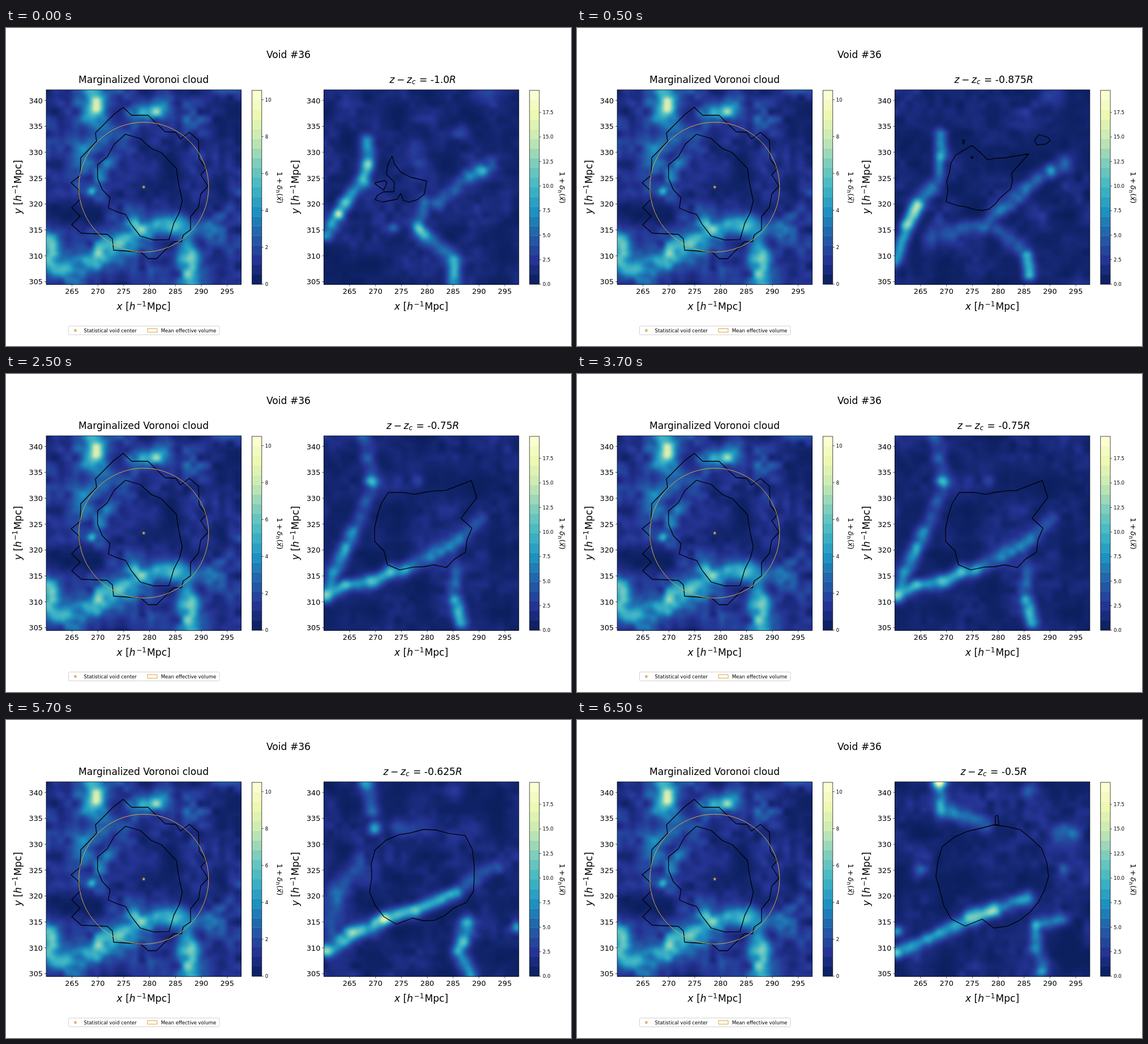
Write an HTML page with a canvas that moves like this. It is 998x561 px and loops after 8 s.

```html
<!DOCTYPE html>
<html lang="en">
<head>
<meta charset="utf-8">
<title>Void #36</title>
<style>
html, body { margin: 0; width: 100%; height: 100%; overflow: hidden; background: #fff; }
canvas, svg { position: absolute; left: 0; top: 0; }
canvas { top: 109px; width: 344.5px; height: 343.5px; }
svg { width: 998px; height: 561px; font-family: "DejaVu Sans", Verdana, sans-serif; }
.big { font-size: 17.12px; }
.mid { font-size: 12.84px; }
.small { font-size: 8.56px; }
.i { font-style: italic; }
.sub { font-size: 70%; }
.line { fill: none; stroke: #000; stroke-width: 1.3; stroke-linejoin: round; }
.axis { fill: none; stroke: #000; stroke-width: .7; }
.gold { fill: none; stroke: #d9a83c; stroke-width: 1; }
.star { fill: #d6a443; }
.s { visibility: hidden; animation: 8s step-end infinite; }
.s0 { animation-name: s0; }
.s1 { animation-name: s1; }
.s2 { animation-name: s2; }
.s3 { animation-name: s3; }
.s4 { animation-name: s4; }
@keyframes s0 { 0% { visibility: visible } 6.25%, 100% { visibility: hidden } }
@keyframes s1 { 0% { visibility: hidden } 6.25% { visibility: visible } 31.25%, 100% { visibility: hidden } }
@keyframes s2 { 0% { visibility: hidden } 31.25% { visibility: visible } 56.25%, 100% { visibility: hidden } }
@keyframes s3 { 0% { visibility: hidden } 56.25% { visibility: visible } 81.25%, 100% { visibility: hidden } }
@keyframes s4 { 0% { visibility: hidden } 81.25%, 100% { visibility: visible } }
</style>
</head>
<body>
<script>
const TOP = 109, W = 344.5, H = 343.5, LEFT = 71, RIGHT = 561.4;
const STOPS = ['081d58', '253494', '225ea8', '1d91c0', '41b6c4', '7fcdbb', 'c7e9b4', 'edf8b1', 'ffffd9']
  .map(h => [0, 2, 4].map(i => parseInt(h.substr(i, 2), 16)));

function color(v) {
  const p = Math.min(.9999, Math.max(0, v)) * 8, i = Math.floor(p);
  return STOPS[i].map((c, k) => c + (STOPS[i + 1][k] - c) * (p - i));
}

// Smooth value noise on a seeded lattice
function noise(seed, cell) {
  const n = Math.ceil(W / cell) + 3, g = [];
  for (let i = 0; i < n * n; i++) {
    seed = (seed * 16807) % 2147483647;
    g.push(seed / 2147483647);
  }
  const ease = t => t * t * (3 - 2 * t), mix = (a, b, t) => a + (b - a) * t;
  return (x, y) => {
    const i = Math.floor(x / cell), j = Math.floor(y / cell), k = j * n + i;
    const u = ease(x / cell - i), v = ease(y / cell - j);
    return mix(mix(g[k], g[k + 1], u), mix(g[k + n], g[k + n + 1], u), v);
  };
}

// Each filament is "radius strength x y x y ..."; a single point makes a blob
function segments(spec) {
  return spec.split(';').flatMap(s => {
    const [r, a, ...p] = s.trim().split(/\s+/).map(Number), out = [];
    for (let i = 0; i < Math.max(2, p.length - 2); i += 2)
      out.push({ r, a, x: p[i], y: p[i + 1], dx: (p[i + 2] ?? p[i]) - p[i], dy: (p[i + 3] ?? p[i + 1]) - p[i + 1] });
    return out;
  });
}

function heat(left, spec, seed, grain, cls) {
  const c = document.createElement('canvas');
  c.width = 173; c.height = 172; c.className = cls;
  c.style.left = left + 'px';
  const ctx = c.getContext('2d'), img = ctx.createImageData(c.width, c.height);
  const segs = segments(spec), fine = noise(seed, 13), lump = noise(seed + 57, 19), broad = noise(seed + 91, 44);
  for (let py = 0, o = 0; py < c.height; py++) for (let px = 0; px < c.width; px++, o += 4) {
    const lx = (px + .5) * W / c.width, ly = (py + .5) * H / c.height;
    let sum = 0;
    for (const s of segs) {
      const x = lx + left - s.x, y = ly + TOP - s.y, len = s.dx ** 2 + s.dy ** 2;
      const t = len ? Math.max(0, Math.min(1, (x * s.dx + y * s.dy) / len)) : 0;
      const d = ((x - t * s.dx) ** 2 + (y - t * s.dy) ** 2) / s.r ** 2;
      if (d < 6) sum += (s.a * Math.exp(-d)) ** 2;
    }
    const f = fine(lx, ly), l = lump(lx, ly);
    const v = .01 + grain * (f + l) * broad(lx, ly) + Math.sqrt(sum) * (.75 + .25 * (f + l));
    img.data.set([...color(v), 255], o);
  }
  ctx.putImageData(img, 0, 0);
  document.body.append(c);
}

const cloud = `12 .72 160 130 161 142; 24 .42 158 115 156 152; 22 .2 165 160 165 190 140 215 128 245;
  15 .2 186 236; 16 .3 268 147; 16 .18 225 155 280 142; 18 .32 236 350 300 347; 18 .28 290 350 355 354;
  17 .33 318 365 322 400 328 450; 18 .33 73 375 82 412 105 424; 20 .27 105 424 160 402 200 380 230 355;
  8 .18 152 286`;

const slides = [
  { z: '-1.0',
    heat: `12 .38 638 200 640 240 632 265 600 308 566 365; 10 .55 588 328; 13 .36 838 249;
      12 .2 855 240 820 262 760 310; 12 .25 740 308 728 352; 12 .35 728 352 740 364;
      14 .22 740 364 790 402; 13 .34 790 410 792 450; 10 .18 685 351; 18 .13 835 117 852 117;
      14 .13 805 185; 16 .1 730 235 725 210`,
    lines: ['682,226 686,240 697,254 714,263 743,270 739,293 726,303 712,307 702,304 697,292 691,302 665,307 652,303 656,295 667,289 685,289 686,272 672,258 674,242',
      '652,273 669,269 673,273 667,286 652,275'] },
  { z: '-0.875',
    heat: `12 .3 642 188 643 225; 11 .17 643 225 640 270; 15 .27 628 282 602 308; 12 .52 602 312 583 350;
      11 .38 583 350 563 410; 12 .33 838 252; 13 .18 860 238 815 264 750 320; 13 .18 750 320;
      13 .17 740 325 720 350 680 350; 13 .18 740 355 790 395; 11 .42 795 402 798 435;
      16 .11 630 370 685 355; 18 .12 845 118`,
    ring: [715, 270, '54 53 46 44 47 51 52 52 53 61 73 62 62 59 63 65 63 65 48 39 46 58 96 55'],
    lines: ['682,197 685,199 683,205 681,202', '696,227 700,228 698,230 696,229',
      '816,188 832,193 836,199 828,205 812,206 808,198'] },
  { z: '-0.75',
    heat: `12 .38 646 190; 13 .16 633 110 640 150 648 190 612 285; 13 .28 615 277 600 305 580 350 567 388;
      12 .48 566 390; 12 .33 566 392 600 372 648 366 680 348 705 346; 13 .25 705 346 750 320 800 290;
      12 .2 785 304 840 255; 12 .13 796 350 795 390; 12 .4 793 400 804 436; 10 .16 728 187`,
    ring: [738, 272, '85 79 85 77 80 67 68 71 85 91 81 90 87 85 87 89 73 62 63 68 77 119 108 68'] },
  { z: '-0.625',
    heat: `13 .38 637 112; 14 .2 637 112 648 160; 12 .2 645 160; 11 .4 651 190; 14 .1 688 190 735 190;
      18 .15 625 250 590 300 575 375; 12 .42 566 406; 13 .38 566 406 610 378 668 350; 11 .4 668 350;
      12 .42 668 350 720 336 795 305; 13 .13 798 303 865 258; 13 .33 814 358 808 390 800 408 820 450;
      10 .3 902 366; 15 .12 790 130`,
    ring: [737, 278, '90 92 88 76 77 78 76 74 95 98 98 98 91 95 98 93 87 82 85 87 90 105 100 93'] },
  { z: '-0.5',
    heat: `13 .75 640 108; 13 .32 641 112 645 158; 14 .2 648 156 722 186; 16 .19 801 125;
      14 .17 850 196 880 202; 10 .19 857 263; 11 .17 608 264; 11 .4 566 410; 12 .32 566 410 620 386 690 354;
      13 .55 695 348 738 334; 14 .3 738 332 795 314; 10 .28 565 372;
      13 .26 855 350 812 363 810 400 822 430; 11 .36 822 442; 10 .2 812 362`,
    ring: [736, 276, '97 93 91 90 90 91 91 78 101 106 102 98 102 102 105 98 92 88 91 91 95 94 98 97'],
    lines: ['739,185 739,170 742,168 744,171 745,185'] }
];

const outer = '207,140 222,154 251,154 281,183 300,184 308,196 324,184 340,198 341,231 354,248 344,259 357,279 344,293 340,316 326,333 326,356 313,365 310,377 296,377 266,407 251,407 238,395 190,392 188,372 179,364 133,362 116,347 131,332 116,317 131,302 129,286 115,273 131,260 132,229 160,200 158,185 190,153';
const inner = [237, 285, '70 77 80 84 102 92 82 63 51 56 65 55 67 78 87 82 92 101 90 75 75 72 74 69'];

const text = (x, y, s, cls, anchor = 'middle', more = '') =>
  `<text x="${x}" y="${y}" class="${cls}" text-anchor="${anchor}" ${more}>${s}</text>`;
const poly = (p, cls = 'line') => `<polygon class="${cls}" points="${p}"/>`;

// Closed outline from radii at equal angles, clockwise from the right
function polar(cx, cy, radii, turn = 0) {
  return radii.map((r, i) => {
    const a = turn + i / radii.length * 2 * Math.PI;
    return `${(cx + r * Math.cos(a)).toFixed(1)},${(cy + r * Math.sin(a)).toFixed(1)}`;
  }).join(' ');
}
const ring = ([cx, cy, radii]) => poly(polar(cx, cy, radii.split(' ').map(Number)));
const star = (cx, cy) => poly(polar(cx, cy, Array.from({ length: 10 }, (_, i) => i % 2 ? 1.5 : 3.6), -Math.PI / 2), 'star');

const unit = v => `<tspan class="i">${v}</tspan> [<tspan class="i">h</tspan>` +
  `<tspan class="sub" dx="1.5" dy="-6.2">−1</tspan><tspan dx="1.2" dy="6.2">Mpc]</tspan>`;

function axes(x0) {
  let s = `<rect class="axis" x="${x0}" y="${TOP}" width="${W}" height="${H}"/>`, d = '';
  for (let i = 0; i < 7; i++) {
    const x = x0 + 45.6 + i * 45.68;
    d += `M${x} 452.5v3`;
    s += text(x, 468.8, 265 + 5 * i, 'mid');
  }
  for (let i = 0; i < 8; i++) {
    const y = 127.8 + i * 45.68;
    d += `M${x0} ${y}h-3`;
    s += text(x0 - 6, y + 4.8, 340 - 5 * i, 'mid', 'end');
  }
  return s + `<path class="axis" d="${d}"/>` + text(x0 + 172.2, 497, unit('x'), 'big') +
    text(0, 0, unit('y'), 'big', 'middle', `transform="translate(${x0 - 44.5} 280.5) rotate(-90)"`);
}

function bar(x, step, count, gap, digits, labelX) {
  let s = '', d = '';
  for (let i = 0; i < 20; i++)
    s += `<rect x="${x}" y="${452 - (i + 1) * 17.1}" width="17.2" height="17.4" fill="rgb(${color((i + .5) / 20).map(Math.round)})"/>`;
  for (let i = 0; i < count; i++) {
    const y = 452 - i * gap;
    d += `M${x + 17.2} ${y}h3`;
    s += text(x + 23.2, y + 3.2, (i * step).toFixed(digits), 'small', 'start');
  }
  return s + `<rect class="axis" x="${x}" y="110" width="17.2" height="342"/><path class="axis" d="${d}"/>` +
    `<g class="mid" transform="translate(${labelX} 253.5) rotate(90)"><text>1<tspan x="10.7">+</tspan>` +
    `<tspan class="i" x="24">δ</tspan><tspan class="i sub" x="32" y="2.2">h</tspan><tspan x="38.3" y="0">(</tspan>` +
    `<tspan class="i" x="43.4">x</tspan><tspan x="51">)</tspan></text>` +
    `<path class="axis" d="M44.5 -9.3h6.5m-2 -1.7l2 1.7l-2 1.7"/></g>`;
}

heat(LEFT, cloud, 412733, .2, '');
slides.forEach((s, i) => heat(RIGHT, s.heat, 73309 + i * 19317, .09, 's s' + i));

let out = axes(LEFT) + axes(RIGHT) + bar(434.6, 2, 6, 65.1, 0, 479) + bar(924.8, 2.5, 8, 43.3, 1, 977.6);
out += text(499, 53, 'Void #36', 'big') + text(243, 96.6, 'Marginalized Voronoi cloud', 'big');
out += poly(outer) + ring(inner) + '<circle class="gold" cx="243.3" cy="280.7" r="114.6"/>' + star(243.3, 280.7);
out += '<rect x="110.5" y="525.8" width="266.5" height="15.4" rx="1.7" fill="#fff" stroke="#ccc" stroke-width=".9"/>';
out += star(122.5, 533.7) + text(137.6, 536.6, 'Statistical void center', 'small', 'start');
out += '<rect class="gold" x="250" y="530.5" width="17" height="6"/>' + text(273.7, 536.6, 'Mean effective volume', 'small', 'start');
slides.forEach((s, i) => {
  const title = `<tspan class="i">z</tspan><tspan dx="3.6">−</tspan><tspan class="i" dx="3.6">z</tspan>` +
    `<tspan class="i sub" dy="2.8">c</tspan><tspan dx="1" dy="-2.8"> = ${s.z}</tspan><tspan class="i">R</tspan>`;
  const shapes = (s.ring ? ring(s.ring) : '') + (s.lines || []).map(p => poly(p)).join('');
  out += `<g class="s s${i}">${text(736.2, 96.6, title, 'big')}${shapes}</g>`;
});
document.body.insertAdjacentHTML('beforeend', `<svg viewBox="0 0 998 561">${out}</svg>`);
</script>
</body>
</html>
```
